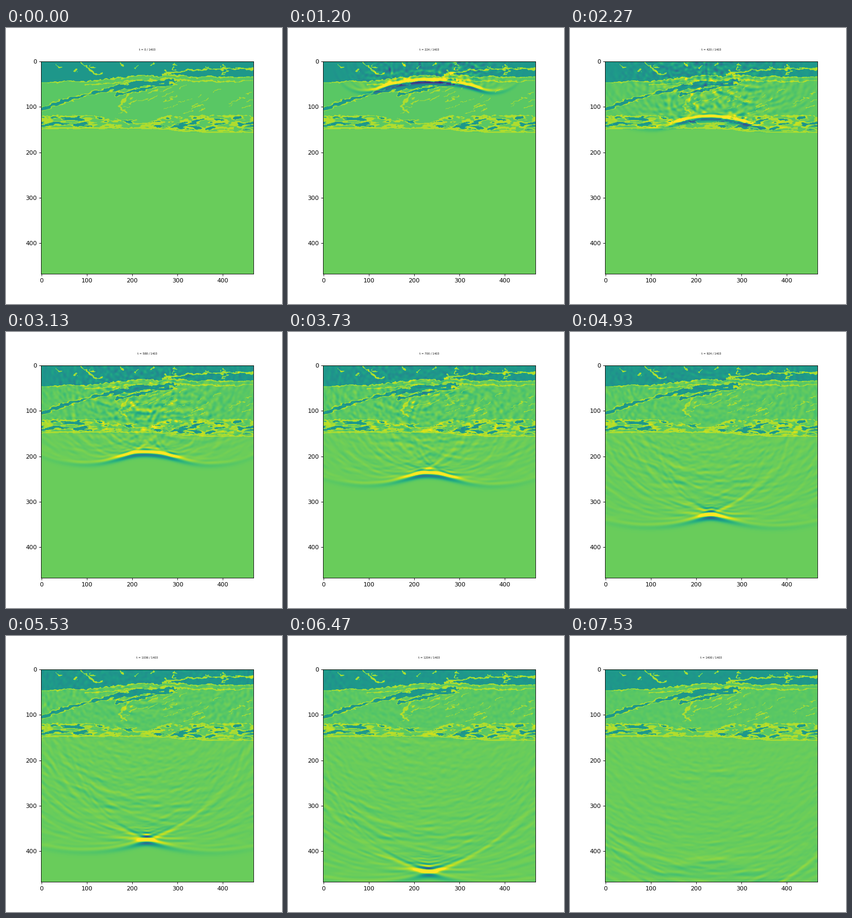
A matplotlib script for the animation above (7.67 s loop, 512 by 512 pixels).

```python
import numpy as np
import matplotlib.pyplot as plt
from matplotlib.animation import FuncAnimation

N, DEPTH, PAD = 468, 172, 20          # grid cells, tissue rows, absorbing margin
SHOTS, STRIDE, LAST = 51, 28, 1403    # stored fields and time steps between them
SUB = 18                              # solver steps per stored field
FRAMES, TICK = 295, 26                # one loop of 7670 ms

WATER, MUSCLE, FAT, FIBRE = range(4)
SHADE = np.array([0.77, 0.745, 0.53, 0.88])
SPEED = np.array([1.0, 1.015, 0.955, 1.08])
DENSITY = np.array([1.0, 1.05, 0.93, 1.25])

C = 0.411                             # cells per time step in water
CENTRE, HALF, FOCUS = 234, 144, 408
WIDTH, START, AMP = 7, 52, 0.5

rng = np.random.default_rng(11)
x = np.arange(N)
gx, gy = np.meshgrid(x, np.arange(DEPTH))


def noise(sx, sy):
    """Smooth random field with unit deviation."""
    fx = np.fft.fftfreq(N)[None, :] * sx
    fy = np.fft.fftfreq(DEPTH)[:, None] * sy
    spec = np.fft.fft2(rng.normal(size=(DEPTH, N)))
    field = np.fft.ifft2(spec * np.exp(-2 * np.pi**2 * (fx**2 + fy**2))).real
    return field / field.std()


wx = gx + 1.8 * noise(2, 2)
wy = gy + 0.9 * noise(2.2, 1.5) + 0.9 * noise(9, 4)


def near(*pts):
    """Distance to a polyline on the warped grid."""
    best = np.full(wx.shape, 1e3)
    for (x0, y0), (x1, y1) in zip(pts, pts[1:]):
        dx, dy = x1 - x0, y1 - y0
        u = np.clip(((wx - x0) * dx + (wy - y0) * dy) / (dx * dx + dy * dy), 0, 1)
        best = np.minimum(best, np.hypot(wx - x0 - u * dx, wy - y0 - u * dy))
    return best


def build_tissue():
    right = np.clip(x - 290, 0, None)
    base = 147.5 + 8.5 / (1 + np.exp((295 - x) / 18)) + 1.5 * np.exp(-x / 25)
    skin = 38 + 8 * np.cos(np.pi * np.minimum(x, 290) / 290) + 4 * np.sin(np.pi * right / 200)
    diag = 46 + 61 * np.clip(1 - x / 310, 0, 1)**2.1
    half = 3 + 2.5 * np.exp(-((x - 195) / 55)**2) - right / 6
    top = 122 + 8 * np.exp(-((x - 200) / 60)**2)

    # positive inside fat, falling off in cells outside it
    streak = noise(6, 1.5)
    band = half - abs(wy - diag) + 1.7 * streak
    branch = 2 - near((170, 72), (207, 65), (279, 50)) + streak
    limit = 0.55 + 1.1 * np.exp(-((x - 195) / 75)**4)
    patch = 2.4 * (noise(6, 1.8) - limit)
    patch = np.minimum(patch, np.minimum(wy - top, base - 4 - wy))
    fat = np.max([skin - wy, band, branch, patch], axis=0)

    fibre = (fat <= 0) & (fat > -2.2)
    fibre |= abs(gy - base + 0.6 * streak) < 1.4
    fibre |= (noise(6, 1.5) > 0.9) & (wy > top) & (wy < base)

    # fascia sheets
    fibre |= (abs(wy - skin - 10) < 1.3) & (gx > 95) & (streak > -0.9)
    sheet = 15 + 14 * np.exp(-(x - 270) / 70)
    fibre |= (abs(wy - sheet) < 1.6) & (gx > 270)
    fibre |= near((88, 1), (100, 15), (126, 31), (133, 26)) < 1.6
    fibre |= near((195, 71), (172, 100), (186, 112)) < 2.2

    for _ in range(14):
        sx, sy = rng.uniform(0, 460), rng.uniform(1, 22)
        dx, dy = rng.normal(0, 6), rng.uniform(3, 9)
        fibre |= (near((sx, sy), (sx + dx, sy + dy), (sx + dx + 6, sy + dy)) < 1.1) & (gy < skin)
    for _ in range(34):
        sx, sy = rng.uniform(150, 455), rng.uniform(58, 116)
        run = rng.uniform(5, 24)
        fibre |= near((sx, sy), (sx + run, sy - 0.4 * run)) < rng.uniform(0.5, 1.1)
    crust = np.sin(x / 9) + np.sin(x / 23 + 1) + 1.2 * (x < 100)
    fibre |= (gy < 2) & (crust > 0.5)

    part = np.where(fibre, FIBRE, np.where(fat > 0, FAT, MUSCLE))
    part[gy > base + 1.5] = WATER
    kind = np.full((N, N), WATER)
    kind[:DEPTH] = part
    return kind


def simulate(kind):
    """Focused pulse driven from a line array along the reflecting top edge."""
    dt = STRIDE / SUB
    grain = np.ones((N, N))
    grain[:DEPTH] += 0.07 * noise(2.5, 2)
    margin = ((1, PAD), (PAD, PAD))
    k = np.pad(kind, margin, mode="edge")
    rho = DENSITY[k] * np.where(k == WATER, 1, np.pad(grain, margin, mode="edge"))
    stiff = (dt * rho * (C * SPEED[k])**2)[1:-1, 1:-1].astype("f4")
    kx = (2 * dt / (rho[:, 1:] + rho[:, :-1])).astype("f4")
    ky = (2 * dt / (rho[1:] + rho[:-1])).astype("f4")

    rows, cols = k.shape
    i, j = np.ogrid[:rows, :cols]
    gap = np.minimum(rows - 1 - i, np.minimum(j, cols - 1 - j))
    loss = 0.25 * np.clip(1 - gap / PAD, 0, 1)**2 + 0.0014 * (k != WATER)
    soak = np.exp(-dt * loss).astype("f4")

    off = np.arange(-HALF, HALF)
    delay = (np.hypot(FOCUS, HALF) - np.hypot(FOCUS, off)) / C
    array = slice(PAD + CENTRE - HALF, PAD + CENTRE + HALF)

    p = np.zeros((rows, cols), "f4")
    vx = np.zeros((rows, cols - 1), "f4")
    vy = np.zeros((rows - 1, cols), "f4")
    view = p[1:1 + N, PAD:PAD + N]
    shots = [view.copy()]
    for n in range(1, (SHOTS - 1) * SUB + 1):
        vx -= kx * (p[:, 1:] - p[:, :-1])
        vy -= ky * (p[1:] - p[:-1])
        p[1:-1, 1:-1] -= stiff * (vx[1:-1, 1:] - vx[1:-1, :-1]
                                  + vy[1:, 1:-1] - vy[:-1, 1:-1])
        p *= soak
        tau = (n * dt - START - delay) / WIDTH
        p[0, array] = AMP * tau * np.exp((1 - tau**2) / 2)
        if n % SUB == 0:
            shots.append(view.copy())
    return shots


tissue = build_tissue()
backdrop = SHADE[tissue].astype("f4")
shots = simulate(tissue)

# fields change on a 15 Hz clock, every second or third beat
beats = np.round(np.arange(SHOTS) * 115 / SHOTS)
starts = beats * 1000 / 15 // TICK

fig = plt.figure(figsize=(6.4, 6.4), dpi=80)
ax = fig.add_axes([65.3 / 512, 55.9 / 512, 394 / 512, 394.4 / 512])
image = ax.imshow(backdrop, cmap="viridis", vmin=0, vmax=1, aspect="auto")
label = ax.text(0.5, 1.05, "", transform=ax.transAxes, ha="center", fontsize=4.5)


def update(i):
    k = int(np.searchsorted(starts, i, side="right")) - 1
    image.set_data(backdrop + shots[k])
    label.set_text(f"t = {k * STRIDE} / {LAST}")
    return image, label


anim = FuncAnimation(fig, update, frames=FRAMES, interval=TICK,
                     init_func=lambda: update(0), repeat=True, repeat_delay=0)
plt.show()
```
